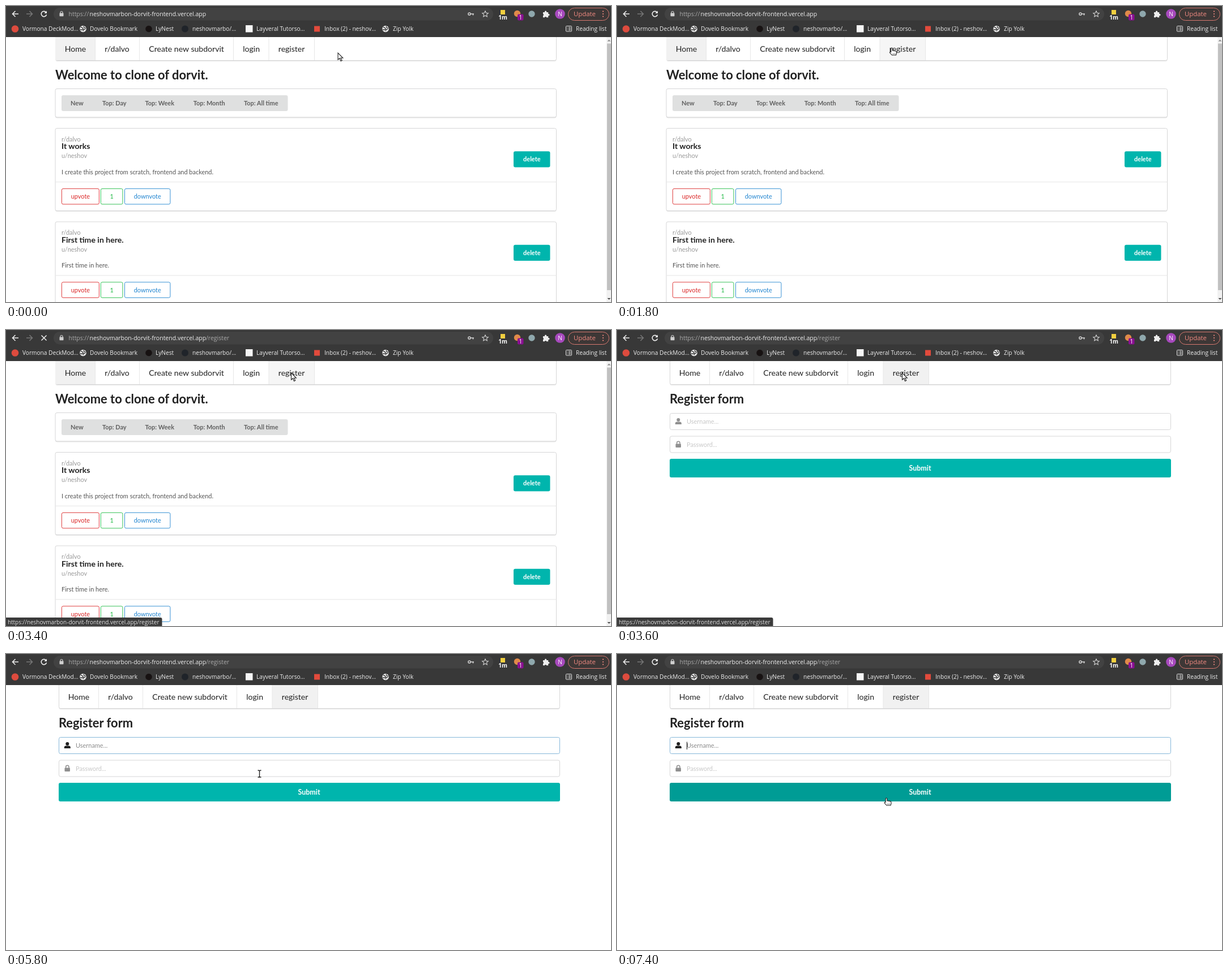
Write an HTML page that moves like this. It is 1068 px wide and 524 px high and loops after 8 s.

```html
<!DOCTYPE html>
<html lang="en">
<head>
<meta charset="utf-8">
<title>Register walkthrough</title>
<style>
html, body { margin: 0; width: 100%; height: 100%; overflow: hidden; background: #fff; }
svg { display: block; width: 100%; height: 100%; }
text { font: 10.95px Lato, sans-serif; white-space: pre; }
.ui { font: 10.15px "Open Sans", "Noto Sans", sans-serif; }
.url { font-size: 10.5px; }
.status { font-size: 9.95px; }
.update { font-size: 11.4px; }
.nav { font-size: 14.07px; }
.title { font-size: 14.07px; font-weight: 700; }
.head { font-size: 21.9px; font-weight: 700; }
.bold { font-weight: 700; }
.big { font-size: 12.5px; font-weight: 700; }
</style>
</head>
<body>
<svg id="stage" viewBox="0 0 1068 524"></svg>
<script>
const LOOP = 8000, STEP = 100;
const INK = '#212121', LINE = '#d6d6d7', TEAL = '#00b5ad';
const HOST = 'neshovmarbon-dorvit-frontend.vercel.app';

const rect = (x, y, w, h, fill, extra = '') =>
  `<rect x="${x}" y="${y}" width="${w}" height="${h}" fill="${fill}" ${extra}/>`;
const text = (x, y, str, cls = '', fill = INK, extra = '') =>
  `<text x="${x}" y="${y}" class="${cls}" fill="${fill}" ${extra}>${str}</text>`;
const mid = (x, y, str, cls, fill) => text(x, y, str, cls, fill, 'text-anchor="middle"');
const dot = (x, y, r, fill) => `<circle cx="${x}" cy="${y}" r="${r}" fill="${fill}"/>`;
const path = (d, stroke, width = 1.5, fill = 'none', extra = '') =>
  `<path d="${d}" stroke="${stroke}" stroke-width="${width}" fill="${fill}" ${extra}/>`;
const group = (id, body, extra = '') => `<g id="${id}" ${extra}>${body}</g>`;

function panel(x, y, w, h) {
  return rect(x, y + 1.5, w, h, '#e6e6e6', 'rx="3"') +
    rect(x, y, w, h, '#fff', `rx="3" stroke="${LINE}"`);
}

function globe(x, y) {
  return dot(x, y, 5.7, '#f1f1f1') +
    path(`M${x - 4} ${y - 3}l3 1 1 2 -2 2 -3 -1M${x + 1} ${y - 5}l1 3 3 1M${x + 4} ${y + 1}l-3 0 -1 3`, '#3a3a3a', 1.4);
}

function toolbar() {
  const light = '#eeeeee';
  const marks = [
    [29, 'Vormona DeckMod…'], [148, 'Dovelo Bookmark'], [264, 'LyNest'], [329, 'neshovmarbo/…'],
    [442, 'Layveral Tutorso…'], [562, 'Inbox (2) - neshov…'], [683, 'Zip Yolk'], [1006, 'Reading list']
  ];
  return rect(0, 0, 1068, 55, '#383838') +
    rect(84, 3, 776, 22.5, '#424242', 'rx="11.2"') +
    path('M22 14H12M16.5 9L11.5 14l5 5', light, 1.6) +
    path('M36 14H46M41.5 9l5 5 -5 5', '#777', 1.5) +
    group('reload', path('M70.7 11.2A4.7 4.7 0 1 0 71.5 15.2', light, 1.6) + path('M72 8.5V13H67.5Z', 'none', 0, light)) +
    group('stop', path('M62.5 9.5l9 9M71.5 9.5l-9 9', light, 1.5)) +
    rect(94.5, 12.5, 7, 5.8, '#cfcfcf', 'rx=".8"') + path('M96 13v-1.5a2 2 0 0 1 4 0V13', '#cfcfcf', 1.2) +
    text(110.5, 17.8, 'https://', 'ui url', '#aaa') +
    text(147.5, 17.8, HOST, 'ui url', '#f0f0f0') +
    group('route', text(353, 17.8, '/register', 'ui url', '#aaa')) +
    '<circle cx="818" cy="14" r="2.1" fill="none" stroke="#d0d0d0" stroke-width="1.5"/>' +
    path('M820 14h6M824.5 14v2.5', '#d0d0d0', 1.6) +
    path('M846 8.8l1.6 3.5 3.7.4 -2.8 2.5.8 3.7 -3.3 -1.9 -3.3 1.9.8 -3.7 -2.8 -2.5 3.7 -.4Z', '#d0d0d0', 1.1) +
    rect(873, 7, 8, 8, '#f2cf3f') +
    mid(877, 24, '1m', 'ui bold', '#fff') +
    dot(902.5, 13.5, 5.7, '#e08a4a') + rect(903, 14.5, 10.5, 11, '#8a0f92', 'rx="2"') +
    mid(908.3, 23.7, '1', 'ui', '#fff') +
    dot(928, 14, 5.7, '#8fa8ad') +
    path('M948 11h3v-1a1.6 1.6 0 0 1 3.2 0v1h3v3h.8a1.6 1.6 0 0 1 0 3.2h-.8v3h-3.1a1.7 1.7 0 0 0-3.2 0H948v-3.2a1.6 1.6 0 0 0 0-3Z', 'none', 0, light) +
    dot(978, 14, 8.8, '#a749bd') + mid(978, 17.8, 'N', 'ui', '#fff') +
    rect(992.5, 3.5, 72, 22, '#3d3736', 'rx="11" stroke="#d87970"') +
    text(1002, 18, 'Update', 'ui update', '#f28b82') +
    [9.5, 14, 18.5].map(y => dot(1054, y, 1.1, '#f28b82')).join('') +
    dot(16, 40.5, 6.3, '#dd4b3e') + globe(136, 40.5) + dot(252, 40.5, 5.8, '#171212') +
    dot(316, 40.5, 6, '#20242a') + rect(423, 34, 12.5, 12.5, '#f5f5f5') +
    rect(544, 35.5, 10, 10, '#e24a3c') + globe(670, 40.5) +
    rect(988.5, 35.5, 10, 9.5, 'none', 'stroke="#e5e5e5" rx="1"') +
    path('M990.5 38h1M993 38h4M990.5 40.3h1M993 40.3h4M990.5 42.6h1M993 42.6h4', '#e5e5e5', 1) +
    marks.map(([x, label]) => text(x, 44, label, 'ui', light)).join('');
}

function navbar(left, active, hoverId = '') {
  const edges = [0, 70.5, 148.5, 314.5, 377, 457.5];
  const labels = ['Home', 'r/dalvo', 'Create new subdorvit', 'login', 'register'];
  const cell = (i, fill, extra) => rect(left + edges[i], 55, edges[i + 1] - edges[i], 41, fill, extra);
  return panel(left + .5, 50, 884, 46.5) +
    cell(active, '#f1f1f1') +
    (hoverId ? cell(4, '#f6f6f6', `id="${hoverId}"`) : '') +
    edges.slice(1).map(e => rect(left + e - .5, 55, 1, 41, '#e7e7e7')).join('') +
    labels.map((s, i) => text(left + edges[i] + 16.8, 81.4, s, 'nav')).join('');
}

function post(y, title, body) {
  const votes = [[98.4, 66, 'upvote', '#db2828'], [167.4, 38.6, '1', '#21ba45'], [209.5, 80.4, 'downvote', '#2185d0']];
  return panel(87, y + .5, 884.5, 146) +
    text(98, y + 23.5, 'r/dalvo', '', '#999') +
    text(98, y + 37, title, 'title') +
    text(98, y + 53, 'u/neshov', '', '#999') +
    text(98, y + 81.5, body, '', '#555') +
    rect(87.5, y + 95, 884, 1, '#e6e6e6') +
    votes.map(([x, w, s, c]) => rect(x, y + 107.4, w, 27.5, '#fff', `rx="2.5" stroke="${c}" stroke-width=".9"`) +
      mid(x + w / 2, y + 125.2, s, '', c)).join('') +
    rect(896, y + 41.2, 64.5, 28.3, TEAL, 'rx="3"') + mid(928.3, y + 59.3, 'delete', 'bold', '#fff');
}

function homePage() {
  const sorts = [[114, 'New'], [170, 'Top: Day'], [245.5, 'Top: Week'], [330.7, 'Top: Month'], [420, 'Top: All time']];
  return navbar(87, 0, 'hover') +
    text(87, 129.7, 'Welcome to clone of dorvit.', 'head') +
    panel(87, 146.5, 884.5, 50.4) +
    rect(98, 158, 399.5, 28, '#dfe0e0', 'rx="3"') +
    sorts.map(([x, s]) => text(x, 175.7, s, 'bold', '#606060')).join('') +
    post(216, 'It works', 'I create this project from scratch, frontend and backend.') +
    post(381.5, 'First time in here.', 'First time in here.') +
    rect(1060, 55, 8, 469, '#f1f1f1') + rect(1061, 66.5, 7, 436.5, '#c1c1c1') +
    path('M1061.5 62.5l3 -3 3 3Z', 'none', 0, '#8a8a8a') + path('M1061.5 517l3 3 3 -3Z', 'none', 0, '#505050');
}

function registerPage() {
  const field = (y, id, label) =>
    rect(93.5, y, 884, 29, '#fff', `id="${id}Box" rx="3" stroke="${LINE}"`) +
    text(123, y + 18.6, label, '', '#c8c8c8', `id="${id}Label"`);
  return navbar(93, 4) +
    text(93, 129.7, 'Register form', 'head') +
    field(147.5, 'user', 'Username...') + field(188, 'pass', 'Password...') +
    group('person', dot(108.3, 159, 3, 'inherit') + path('M102.8 167v-1.5q0 -3 3 -3h5q3 0 3 3V167Z', 'none', 0, 'inherit')) +
    rect(103.5, 201.5, 9.5, 6.5, '#909090', 'rx="1"') + path('M105.6 202v-2a2.7 2.7 0 0 1 5.4 0v2', '#909090', 1.5) +
    rect(123, 155.5, 1, 13.5, '#111', 'id="caret"') +
    rect(93, 228, 885, 33, TEAL, 'id="submit" rx="3"') + mid(535, 249.2, 'Submit', 'big', '#fff');
}

function cursors() {
  const beam = 'M-3 -6H-1.5Q0 -6 0 -4.5V4.5Q0 6 -1.5 6H-3M3 -6H1.5Q0 -6 0 -4.5M0 4.5Q0 6 1.5 6H3';
  return group('arrow', path('M0 0V12L3 9.5 5 14.5 7.2 13.5 5 9H8.8Z', '#222', 1.1, '#fff')) +
    group('hand', path('M-1.3 7.5V1.3a1.3 1.3 0 0 1 2.6 0V4.8L6.8 5.6Q8.5 6 8.5 7.8V10L7.5 13H.5L-3.5 8.5Q-3.3 6.5 -1.3 7.5Z', '#222', 1.1, '#fff') +
      path('M2 10v1.5M4 10v1.5M6 10v1.5', '#222', .8)) +
    group('beam', path(beam, '#fff', 3) + path(beam, '#222', 1.4));
}

const stage = document.getElementById('stage');
stage.innerHTML = rect(0, 0, 1068, 524, '#fff') + group('home', homePage()) + group('form', registerPage()) +
  toolbar() +
  group('status', rect(-4, 509, 279.5, 20, '#3b3b3b', 'rx="3"') +
    text(3, 520.8, 'https://' + HOST + '/register', 'ui status', '#e4e4e4')) +
  group('pointer', cursors());

const el = id => document.getElementById(id);
const show = (id, on) => el(id).setAttribute('visibility', on ? 'inherit' : 'hidden');
const paint = (id, fill) => el(id).setAttribute('fill', fill);

// [time, x, y] of the pointer's hot spot
const route = [
  [800, 586, 83], [1100, 562, 88], [1500, 500, 85], [1700, 480, 73], [1800, 485, 74],
  [2000, 493, 67], [2200, 509, 78], [2400, 503.5, 76], [4000, 503.5, 76], [4300, 450, 102],
  [4600, 388.5, 142.5], [4900, 392, 150], [5000, 392, 150], [5300, 393, 155], [5500, 393, 155],
  [5700, 425, 188], [5800, 447.5, 212], [6000, 474, 264], [6200, 474, 264], [6300, 475.5, 250.5],
  [6400, 475.5, 250.5], [6700, 475.5, 255]
];

function pointerAt(t) {
  const next = route.findIndex(k => k[0] >= t);
  if (next < 0) return route[route.length - 1].slice(1);
  if (next === 0) return route[0].slice(1);
  const [t0, x0, y0] = route[next - 1], [t1, x1, y1] = route[next];
  const p = (t - t0) / (t1 - t0);
  return [x0 + (x1 - x0) * p, y0 + (y1 - y0) * p];
}

function pointerKind(t, x, y) {
  if (t < 3600) return x < 545 && t < 3400 ? 'hand' : 'arrow';
  const inField = (y > 147 && y < 177) || (y > 187 && y < 217);
  if (t >= 4800 && inField) return 'beam';
  return t >= 5800 && y > 228 && y < 261 ? 'hand' : 'arrow';
}

function statusOpacity(t) {
  if (t < 3300) return 0;
  return Math.max(0, Math.min(1, 1 - (t - 4400) / 500));
}

function draw(time) {
  const t = Math.floor(time / STEP) * STEP;
  const onForm = t >= 3600, loading = t >= 3300 && !onForm, focused = t >= 5100;
  const [x, y] = pointerAt(t), kind = pointerKind(t, x, y);
  show('home', !onForm);
  show('form', onForm);
  show('hover', !onForm && x < 545);
  show('reload', !loading);
  show('stop', loading);
  show('route', t >= 3300);
  el('status').setAttribute('opacity', statusOpacity(t));

  el('userBox').setAttribute('stroke', focused ? '#85b7d9' : LINE);
  paint('userLabel', focused ? '#8c8c8c' : '#c8c8c8');
  paint('person', focused ? '#1f1f1f' : '#909090');
  const caretOn = (t >= 5300 && t < 5800) || (t >= 6300 && t < 6800) || t >= 7400;
  show('caret', onForm && caretOn);
  paint('submit', t >= 6500 ? '#009c95' : t === 5900 ? '#00a9a1' : TEAL);

  el('pointer').setAttribute('transform', `translate(${x} ${y})`);
  ['arrow', 'hand', 'beam'].forEach(id => show(id, id === kind));
}

function tick(now) {
  draw(now % LOOP);
  requestAnimationFrame(tick);
}
draw(0);
requestAnimationFrame(tick);
</script>
</body>
</html>
```
